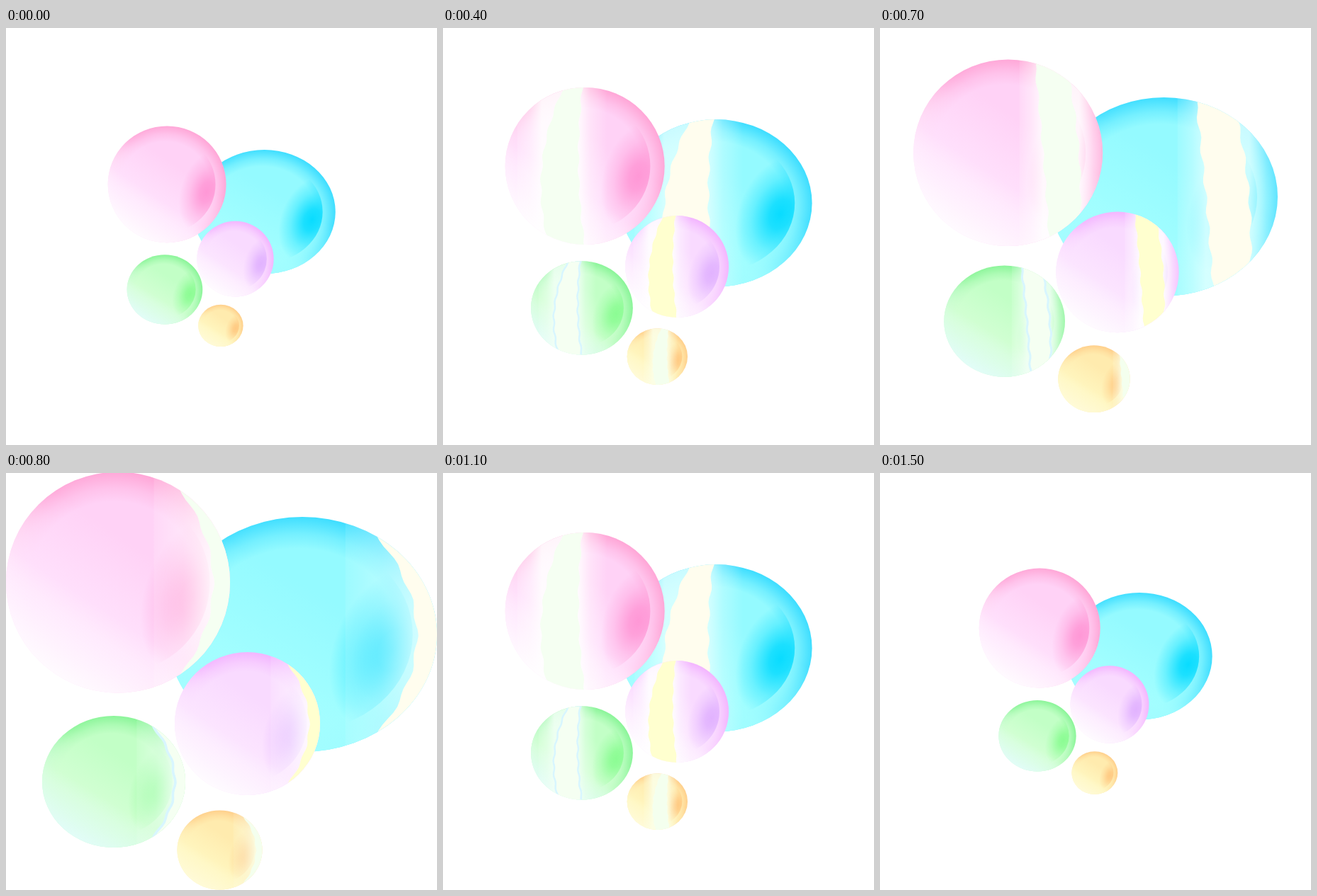
Recreate the animation shown at these times as an HTML page with a canvas. Size 608x589 px, loop 1.6 s.

```html
<!DOCTYPE html>
<html>
<head>
<meta charset="utf-8">
<title>Bubbles</title>
<style>
  html, body { margin: 0; width: 608px; height: 589px; overflow: hidden; background: #fff }
  canvas { display: block }
</style>
</head>
<body>
<canvas id="stage" width="608" height="589"></canvas>
<script>
const ctx = document.getElementById('stage').getContext('2d');

// Geometry at full zoom, back to front
const bubbles = [
  { x: 418, y: 228, rx: 190, ry: 166, light: '#a4ffff', base: '#94faff', rim: '#40deff', fade: '#a4fcff', dark: '#00daff', veil: '#dcffff', core: '#fffdee' },
  { x: 158, y: 154.5, rx: 158, ry: 156, light: '#ffe6fe', base: '#ffd2f6', rim: '#ffa8d8', fade: '#ffffff', dark: '#ff94d4', veil: '#ffffff', core: '#f5fff2' },
  { x: 340.5, y: 354, rx: 102.5, ry: 101, light: '#fdeaff', base: '#f9daff', rim: '#f3b6ff', fade: '#ffffff', dark: '#e0b0ff', veil: '#ffffff', core: '#ffffcf' },
  { x: 152, y: 436, rx: 101, ry: 93, light: '#d8ffd8', base: '#c2ffc6', rim: '#8cf59a', fade: '#e4fcff', dark: '#88fc90', veil: '#f2fff6', core: '#f5fff2', outline: '#d8f6ff' },
  { x: 301.5, y: 532.5, rx: 60, ry: 56, light: '#fff9c4', base: '#ffebae', rim: '#ffd08c', fade: '#fffbdc', dark: '#ffc880', veil: '#fbffe8', core: '#f4ffee', shift: .4 }
];

// Gleam: left and right edge as [top, middle, bottom], top height, start of its veil
const gleams = {
  3: { left: [-.6, -.95, -.7], right: [-.3, -.55, -.4], top: -1, veil: -1.2 },
  4: { left: [-.27, -.54, -.45], right: [-.03, -.08, 0], top: -1, veil: -.85 },
  6: { left: [.04, -.06, 0], right: [.17, .35, .28], top: -.7, veil: -.25 },
  7: { left: [.28, .37, .44], right: [.6, .75, .74], top: -1, veil: .12 },
  8: { left: [.43, .85, .42], right: [1.2, 1.2, 1.2], top: -1, veil: .32 }
};
gleams[5] = gleams[4];
const zooms = [.528, .541, .595, .661, .712, .712, .744, .845, 1];

const addStops = (gradient, stops) => {
  for (const [at, color] of stops) gradient.addColorStop(at, color);
  return gradient;
};
const linear = (x0, y0, x1, y1, ...stops) => addStops(ctx.createLinearGradient(x0, y0, x1, y1), stops);
const radial = (x, y, r, ...stops) => addStops(ctx.createRadialGradient(x, y, 0, x, y, r), stops);

function disc(r) {
  ctx.beginPath();
  ctx.arc(0, 0, r, 0, 7);
}

function paint(fill) {
  ctx.fillStyle = fill;
  ctx.fillRect(-2, -2, 4, 4);
}

function shade(b) {
  paint(linear(.85, -.5, -.6, .8, [0, b.rim], [.5, b.rim], [1, b.fade]));
  paint(radial(-.03, .03, 1.03, [0, b.base], [.74, b.base], [.86, b.base + 'a0'], [1, b.base + '00']));
  paint(linear(.2, -.3, -.5, .7, [0, b.light + '00'], [.7, b.light + 'dd'], [1, b.light + 'dd']));

  // Tilted crescent inside the right rim
  ctx.save();
  disc(.82);
  ctx.clip();
  ctx.translate(.67, .13);
  ctx.rotate(.3);
  ctx.scale(.44, .72);
  paint(radial(0, 0, 1, [0, b.dark + 'f0'], [.25, b.dark + 'd0'], [.65, b.dark + '50'], [1, b.dark + '00']));
  ctx.restore();

  paint(linear(.1, .4, -.3, 1, [0, b.fade + '00'], [1, b.fade + 'cc']));
}

function edgeX([top, middle, bottom], u) {
  const bend = 2 * middle - (top + bottom) / 2;
  return top * (1 - u) ** 2 + 2 * bend * u * (1 - u) + bottom * u * u;
}

function gleam(b, g, shift) {
  const from = g.veil, left = g.left[1], right = g.right[1], to = right + .36;
  const at = x => (x - from) / (to - from);
  ctx.translate(shift, 0);
  ctx.fillStyle = linear(from, 0, to, 0,
    [0, b.veil + '20'], [at((from + left) / 2), b.veil + '70'], [at(left), b.veil + 'e0'],
    [at(right), b.veil + 'e0'], [at(right + .15), b.veil + '60'], [1, b.veil + '00']);
  ctx.fillRect(from, -1.1, to - from, 2.2);

  ctx.beginPath();
  const steps = 40;
  for (let i = 0; i <= 2 * steps + 1; i++) {
    const onLeft = i <= steps;
    const u = (onLeft ? i : 2 * steps + 1 - i) / steps;
    const wobble = g.top < -.9 ? .012 * Math.sin(u * 41 + (onLeft ? 0 : 2)) : 0;
    ctx.lineTo(edgeX(onLeft ? g.left : g.right, u) + wobble, g.top + u * (1.02 - g.top));
  }
  ctx.closePath();
  ctx.fillStyle = b.core;
  ctx.fill();
  if (b.outline) {
    ctx.strokeStyle = b.outline;
    ctx.lineWidth = .035;
    ctx.stroke();
  }
}

function draw(now) {
  const tick = Math.floor(now / 100) % 16;
  const pose = Math.min(tick, 16 - tick);
  const zoom = zooms[pose];
  ctx.setTransform(1, 0, 0, 1, 0, 0);
  ctx.fillStyle = '#fff';
  ctx.fillRect(0, 0, 608, 589);
  ctx.translate(304.5, 295);
  ctx.scale(zoom, zoom);
  ctx.translate(-304.5, -295);
  for (const b of bubbles) {
    ctx.save();
    ctx.translate(b.x, b.y);
    ctx.scale(b.rx, b.ry);
    disc(1);
    ctx.clip();
    shade(b);
    if (gleams[pose]) gleam(b, gleams[pose], pose < 8 ? b.shift || 0 : 0);
    ctx.restore();
  }
}

const start = performance.now();
function loop() {
  draw(performance.now() - start);
  requestAnimationFrame(loop);
}
loop();
</script>
</body>
</html>
```
